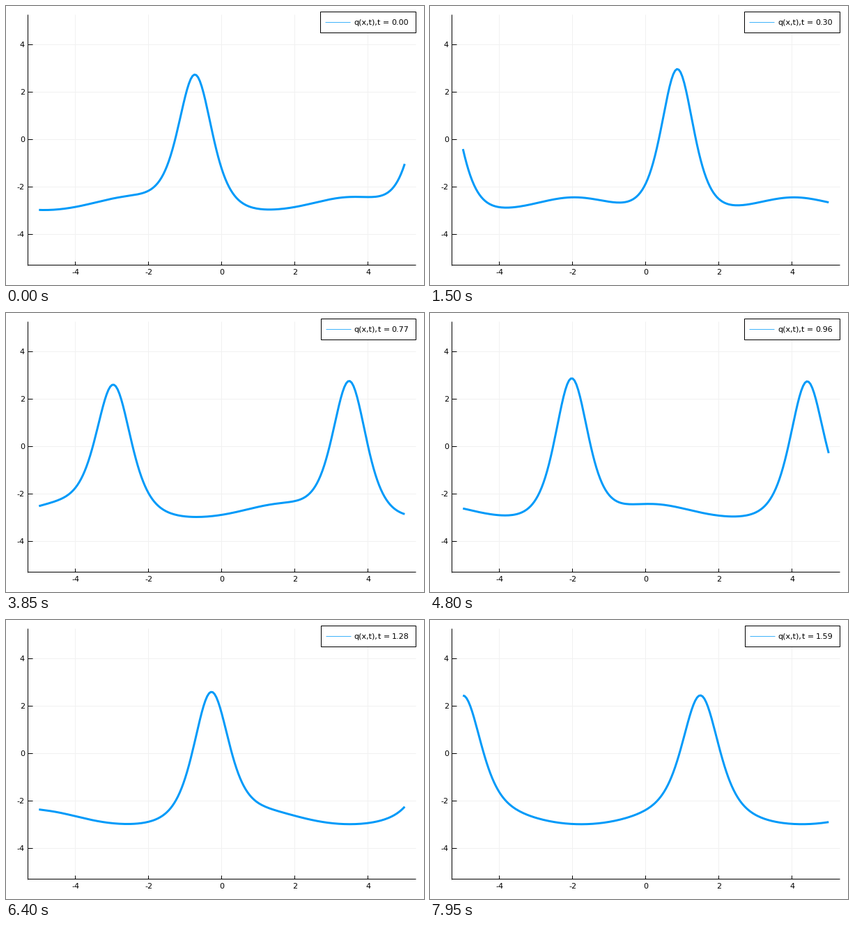
A matplotlib script for the animation above (8 s loop, 600x400 px).

```python
"""Two-phase travelling wave of the KdV equation, drawn as a moving curve.

q = mean + 2 (log theta)_xx, with a genus-2 theta function whose constants
follow from the band edges 0 < e1 < e2 < e3 < e4.  The four edges and the two
phases are settled by a few turning points of the wave.
"""
import itertools
import numpy as np
import matplotlib.pyplot as plt
from matplotlib.animation import FuncAnimation
from matplotlib.patches import Rectangle

W, H, DPI = 600, 400, 100
FRAMES, INTERVAL, DT = 160, 50, 0.01
BLUE = "#009AF9"

# turning points of the wave: t, x, q
KEYS = np.array([
    (0.00, -0.73, 2.75), (0.30, 0.86, 2.99), (0.53, -4.38, 2.73),
    (0.53, 2.07, 2.57), (0.77, -2.97, 2.62), (0.77, 3.47, 2.78),
    (0.96, -2.02, 2.89), (0.96, 4.41, 2.76), (1.28, -0.30, 2.60),
    (1.59, 1.48, 2.47), (0.30, -1.95, -2.44), (0.30, -0.70, -2.65),
    (0.30, 2.50, -2.77), (0.96, 2.38, -2.95), (1.28, -2.60, -2.97),
    (1.28, 3.45, -2.98),
]).T
STEP = 0.05

NODES = np.cos((np.arange(600) + 0.5) * np.pi / 600)
LATTICE = np.array(list(itertools.product(range(-8, 9), range(-4, 5))), float)
FLIP = np.diag([1.0, -1.0])


def moments(edges, k):
    """Integrals of 1, s, s^2 over |R(s)|^(1/2) between edges k and k+1."""
    a, b = edges[k], edges[k + 1]
    s = (a + b) / 2 + (b - a) / 2 * NODES
    rest = np.delete(edges, [k, k + 1])
    w = np.pi / len(s) / np.sqrt(np.abs(np.prod(s[:, None] - rest, axis=1)))
    return [w.sum(), w @ s, w @ s**2]


def build_wave(logs):
    """Theta weights, wavenumbers, frequencies and mean level."""
    e1, e2, band, gap = np.exp(logs)
    edges = np.array([0, e1, e2, e2 + band, e2 + band + gap])
    gaps = np.array([moments(edges, 1), moments(edges, 3)])
    bands = np.array([moments(edges, 0), moments(edges, 2)])[:, :2]
    g = gaps[:, :2]
    inv = np.linalg.inv(g)
    m = np.array([[1, 0], [1, -1]]) @ bands @ inv @ FLIP
    c = np.pi * FLIP @ inv.T
    total = edges.sum()
    k = 2 * c[:, 1]
    omega = -(8 * c[:, 0] + 4 * total * c[:, 1])
    mean = -2 * np.linalg.solve(g, -gaps[:, 2])[1] - total
    weight = np.exp(-np.pi * np.einsum("ni,ij,nj->n", LATTICE, m, LATTICE))
    return weight, LATTICE @ k, LATTICE @ omega, mean


def field(wave, phases, x, t):
    weight, k, omega, mean = wave
    z = np.multiply.outer(x, k) + np.multiply.outer(t, omega) + LATTICE @ phases
    cos, sin = np.cos(z), np.sin(z)
    th = cos @ weight
    d1 = -(sin @ (weight * k)) / th
    d2 = -(cos @ (weight * k * k)) / th
    return mean + 2 * (d2 - d1**2)


def misfit(wave, phases):
    """Height errors, and slopes scaled by how sharply the wave turns."""
    t, x, q = KEYS
    left, mid, right = (field(wave, phases, x + d, t) for d in (-STEP, 0, STEP))
    bend = np.where(q > 0, 29, 2)
    return np.concatenate([mid - q, (right - left) / (2 * STEP * bend)])


def residual(p):
    return misfit(build_wave(p[:4]), p[4:])


def refine(p, rounds=30):
    """Damped Gauss-Newton."""
    damp, r = 1e-2, residual(p)
    for _ in range(rounds):
        jac = np.array([(residual(p + h) - r) / 1e-5
                        for h in 1e-5 * np.eye(len(p))]).T
        a = jac.T @ jac
        step = np.linalg.solve(a + damp * np.diag(np.diag(a)), -jac.T @ r)
        trial = p + np.clip(step, -0.3, 0.3)
        r_new = residual(trial)
        if r_new @ r_new < r @ r:
            p, r, damp = trial, r_new, damp / 4
        else:
            damp *= 5
    return r @ r, p


def fit():
    starts = []
    for band in np.linspace(0.15, 0.4, 11):
        logs = np.log([0.00108, 2.7, band, 0.29])
        wave = build_wave(logs)
        for a, b in itertools.product(range(24), range(10)):
            phases = np.array([a / 24, b / 10]) * 2 * np.pi
            r = misfit(wave, phases)
            starts.append((r @ r, np.concatenate([logs, phases])))
    starts.sort(key=lambda s: s[0])
    return min((refine(p) for _, p in starts[:10]), key=lambda s: s[0])[1]


with np.errstate(all="ignore"):
    best = fit()
WAVE, PHASES = build_wave(best[:4]), best[4:]


# ---- drawing, in pixels with y downwards ----
def px(x):
    return 309.8 + 52.5 * x


def py(q):
    return 191.5 - 33.97 * q


fig = plt.figure(figsize=(W / DPI, H / DPI), dpi=DPI, facecolor="white")
ax = fig.add_axes([0, 0, 1, 1])
ax.set_xlim(0, W)
ax.set_ylim(H, 0)
ax.axis("off")


def line(xs, ys, color="black", width=1.0, **kw):
    return ax.plot(xs, ys, color=color, lw=width * 72 / DPI,
                   solid_capstyle="butt", **kw)[0]


def label(x, y, s, **kw):
    return ax.text(x, y, s, family="DejaVu Sans", size=8, va="baseline", **kw)


# whole numbers here name pixel columns and rows
LEFT, RIGHT, TOP, BOTTOM = 31, 588, 12, 371
TICKS = range(-4, 5, 2)
for v in TICKS:
    line([int(px(v))] * 2, [TOP, BOTTOM], "#f1f1f1")
    line([LEFT, RIGHT], [int(py(v))] * 2, "#f1f1f1")
for v in TICKS:
    col, row = int(px(v)), int(py(v))
    line([col, col], [BOTTOM, BOTTOM - 5])
    line([LEFT, LEFT + 7], [row, row])
    label(px(v), 385, str(v), ha="center")
    label(27, row + 4, str(v), ha="right")
line([LEFT, LEFT], [TOP, BOTTOM + 1])
line([LEFT, RIGHT], [BOTTOM, BOTTOM])

xs = np.linspace(-5, 5, 201)
curve = line(px(xs), py(0 * xs), BLUE, 3, solid_joinstyle="round", zorder=3)

BOX_X, BOX_Y, BOX_W, BOX_H = 451, 8, 137, 30
box = Rectangle((BOX_X, BOX_Y), BOX_W, BOX_H, fc="white", ec="black",
                lw=72 / DPI, zorder=4)
ax.add_patch(box)
key = line([458, 494], [23, 23], BLUE, 1, alpha=0.75, zorder=5)
words = [label(x, 27, s, zorder=5)
         for x, s in ((499, "q(x,t),"), (533, "t ="), (553, ""))]
homes = [w.get_position()[0] for w in words]


def draw(i):
    t = i * DT
    curve.set_ydata(py(field(WAVE, PHASES, xs, t)))
    stamp = f"{t:.2f}"
    words[-1].set_text(stamp)
    # the legend hugs its text, so narrow last digits pull in its left side
    shift = 0 if stamp[-1] in "046" else 1
    box.set_x(BOX_X + shift)
    box.set_width(BOX_W - shift)
    key.set_xdata([458 + shift, 494 + shift])
    for word, x in zip(words, homes):
        word.set_x(x + shift / 2)
    return curve, box, key, *words


anim = FuncAnimation(fig, draw, frames=FRAMES, interval=INTERVAL,
                     repeat=True, repeat_delay=0, blit=False)
plt.show()
```
